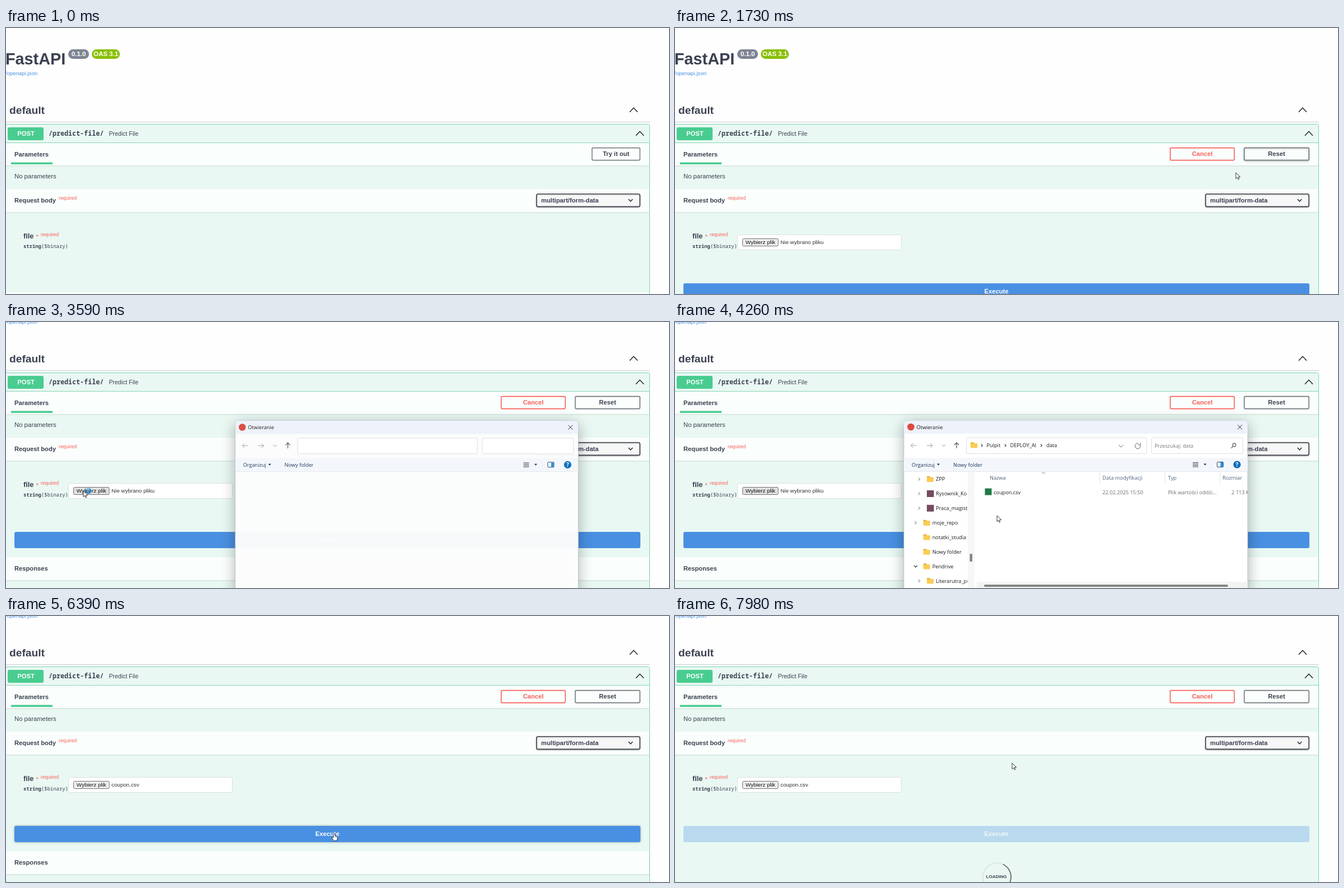
These frames come from a looping animation (1182x474 px, 8 s). An HTML page with a canvas:

```html
<!DOCTYPE html>
<html lang="pl">
<head>
<meta charset="utf-8">
<title>API docs</title>
<style>
  html, body { margin: 0; width: 100%; height: 100%; overflow: hidden; background: #fefefe; }
  canvas { display: block; }
</style>
</head>
<body>
<canvas id="stage" width="1182" height="474"></canvas>
<script>
const ctx = document.getElementById('stage').getContext('2d');
const LOOP = 8000;
const SANS = '"Liberation Sans", Arial, sans-serif';
const MONO = '"Noto Sans Mono", monospace';
const UI = '"Open Sans", sans-serif';
const INK = '#3b4151', RED = '#f9605a', GREEN = '#49cc90', MINT = '#e9f8f3', PALE = '#fafefc';
const BLUE = [73, 144, 226];

// Key moments in ms
const TRY = 1330, PICK = 2990, DIALOG = 3450, LISTED = 3900, CHOSEN = 5460, SEND = 6786;
const PATH = [
  [330, 1021, 436], [990, 1085, 226], [1264, 1085, 226], [1990, 965, 271],
  [2130, 965, 271], [2860, 138, 301], [3860, 138, 301], [4260, 574, 345],
  [4500, 606, 312], [5650, 606, 312], [5660, 606, 314], [5890, 606, 314],
  [6390, 585, 387], [6800, 585, 387], [7520, 601, 262], [8000, 601, 262]
];
const CLICKS = [[1190, 1330], [2860, 2990], [4520, 4585], [4650, 5200], [6720, 6850]];

const ramp = (t, a, b) => Math.min(1, Math.max(0, (t - a) / (b - a)));
const smooth = u => u * u * (3 - 2 * u);
const within = (t, a, b) => t >= a && t < b;
const blend = (a, b, u) => `rgb(${a.map((v, i) => Math.round(v + (b[i] - v) * u))})`;

function text(s, x, y, size, { color = INK, weight = 400, font = SANS, align = 'left' } = {}) {
  ctx.font = `${weight} ${size}px ${font}`;
  ctx.fillStyle = color;
  ctx.textAlign = align;
  ctx.fillText(s, x, y);
}
const bold = (s, x, y, size = 11.2, color = INK, align = 'left') =>
  text(s, x, y, size, { color, weight: 700, align });
const ui = (s, x, y, color = '#1b1b1b') => text(s, x, y, 9.2, { color, font: UI });

function rect(x, y, w, h, color) {
  ctx.fillStyle = color;
  ctx.fillRect(x, y, w, h);
}

function box(x, y, w, h, r, fill, stroke, lw = 1) {
  ctx.beginPath();
  ctx.roundRect(x, y, w, h, r);
  if (fill) { ctx.fillStyle = fill; ctx.fill(); }
  if (stroke) { ctx.strokeStyle = stroke; ctx.lineWidth = lw; ctx.stroke(); }
}

function line(points, color, lw = 1) {
  ctx.beginPath();
  points.forEach(([x, y]) => ctx.lineTo(x, y));
  ctx.strokeStyle = color;
  ctx.lineWidth = lw;
  ctx.stroke();
}

function disc(x, y, r, color) {
  ctx.beginPath();
  ctx.arc(x, y, r, 0, 7);
  ctx.fillStyle = color;
  ctx.fill();
}

function arc(x, y, r, from, to, color, lw) {
  ctx.beginPath();
  ctx.arc(x, y, r, from, to);
  ctx.strokeStyle = color;
  ctx.lineWidth = lw;
  ctx.stroke();
}

function polygon(points, fill, stroke, lw = 0.9) {
  ctx.beginPath();
  points.forEach(([x, y]) => ctx.lineTo(x, y));
  ctx.closePath();
  ctx.fillStyle = fill;
  ctx.fill();
  if (stroke) { ctx.strokeStyle = stroke; ctx.lineWidth = lw; ctx.stroke(); }
}

// dy < 0 points up, dy > 0 points down
const caret = (x, y, dx, dy, color, lw) =>
  line([[x - dx, y - dy], [x, y + dy], [x + dx, y - dy]], color, lw);
const caretRight = (x, y, d, color, lw = 1) =>
  line([[x - d / 2, y - d], [x + d / 2, y], [x - d / 2, y + d]], color, lw);

function withShadow(alpha, blur, dy, draw) {
  ctx.save();
  ctx.shadowColor = `rgba(0,0,0,${alpha})`;
  ctx.shadowBlur = blur;
  ctx.shadowOffsetY = dy;
  draw();
  ctx.restore();
}

function sectionHead(y, h, label) {
  withShadow(0.12, 2, 1, () => rect(-5, y, 1152, h, PALE));
  bold(label, 15, y + h / 2 + 3.8);
}

function button(label, x, w, color, shade = 0) {
  const draw = () => box(x + 0.8, 213.6, w - 1.6, 22, 2, PALE, color, 1.6);
  if (shade > 0) withShadow(0.35 * shade, 4, 1, draw); else draw();
  bold(label, x + w / 2, 228.4, 11.2, color === RED ? RED : INK, 'center');
}

function required(x, y) {
  text('required', x, y, 8.75, { color: RED });
}

function drawHeader() {
  bold('FastAPI', -1, 64.5, 28.8);
  box(111, 38, 37, 17, 8.5, '#7d8492');
  bold('0.1.0', 129.5, 50, 11.5, '#fff', 'center');
  box(153, 38, 50, 17, 8.5, '#89bf04');
  bold('OAS 3.1', 178, 50, 11.5, '#fff', 'center');
  text('/openapi.json', -1, 83.5, 9.6, { color: '#4990e2' });

  bold('default', 6, 153.3, 19.2);
  caret(1119, 146, 7, -3.7, '#222', 1.5);
  rect(0, 167, 1148, 1, '#c9cbd0');
}

function drawFileInput(t) {
  box(111.5, 368.5, 292, 27, 3, '#fff', '#d9dfdd');
  const hot = within(t, 2780, 5660);
  box(120.5, 375.5, 63.5, 13, 2, hot ? '#e1e1e1' : '#efefef', '#6f6f6f');
  text('Wybierz plik', 152.3, 385.4, 9.85, { color: '#111', align: 'center' });
  text(t < CHOSEN ? 'Nie wybrano pliku' : 'coupon.csv', 188, 385.4, 9.75, { color: '#333' });
}

function drawExecute(t) {
  const fade = 1 - 0.7 * smooth(ramp(t, SEND, SEND + 300));
  const base = [233, 248, 243];
  const bar = () => box(15, 455, 1116, 29, 3, blend(base, BLUE, fade));
  if (within(t, 6200, SEND)) withShadow(0.3, 4, 0, bar); else bar();
  bold('Execute', 573, 473.3, 11.2, blend(base, [255, 255, 255], fade), 'center');
}

function drawLoader(t) {
  const x = 574, y = 546, turn = (t - SEND) / 1000 * 2 * Math.PI - Math.PI / 2;
  arc(x, y, 25, 0, 7, 'rgba(85,85,85,.12)', 1.6);
  arc(x, y, 25, turn - Math.PI / 4, turn + Math.PI / 4, 'rgba(0,0,0,.6)', 1.6);
  bold('LOADING', 573, 547.8, 8, INK, 'center');
}

function drawPage(t) {
  const open = t >= TRY, sending = t >= SEND;
  drawHeader();

  box(-5.5, 171.5, 1153, 700, 3, MINT, '#79d3ad', 1);
  rect(0, 204, 1147, 1, '#8ad5b6');
  box(3, 177, 64, 23, 3, GREEN);
  bold('POST', 35.5, 192, 11.2, '#fff', 'center');
  text('/predict-file/', 76, 192, 11.7, { weight: 700, font: MONO });
  text('Predict File', 183.5, 191.7, 10.5);
  caret(1130, 188, 7, -3.7, '#222', 1.5);

  sectionHead(205, 40, 'Parameters');
  rect(9, 239.5, 74, 3.5, GREEN);
  if (open) {
    button('Cancel', 882, 116, RED);
    button('Reset', 1014, 117, '#73767d', 1 - ramp(t, 1600, 1900));
  } else {
    button('Try it out', 1044, 87, '#7f8288');
  }
  text('No parameters', 15, 267.5, 11.3);

  sectionHead(287, 41, 'Request body');
  required(94, 305.7);
  withShadow(0.25, 2, 1, () => box(945.8, 295.8, 184.4, 22.6, 3, '#f7f7f7', '#41444e', 1.6));
  bold('multipart/form-data', 954, 311);
  caret(1113.5, 307, 3.7, 1.9, '#222', 1.5);

  bold('file', 31, 375.3, 12.8);
  text('*', 53.5, 376, 11.5, { color: RED });
  required(62, 370.5);
  text('string', 31, 391.5, 8.9, { weight: 700, font: MONO });
  text('($binary)', 63, 391.5, 8.9, { weight: 500, font: MONO });

  if (open) {
    drawFileInput(t);
    drawExecute(t);
  }
  if (sending) drawLoader(t);
  else sectionHead(open ? 500 : 471, 41, 'Responses');
}

function folder(x, y) {
  box(x - 6, y - 5, 6, 4, 1, '#e0a22c');
  box(x - 6, y - 3.5, 12, 8.5, 1, '#fbcb52');
}

function drawSidebar() {
  const rows = [
    ['ZPP', 1, 'right'], ['Rysownik_Ko', 1, 'right', 1], ['Praca_magist', 1, 'right', 1],
    ['moje_repo', 0, 'right'], ['notatki_studia', 0], ['Nowy folder', 0],
    ['Pendrive', 0, 'down'], ['Literarutra_pr', 1, 'right']
  ];
  ctx.save();
  ctx.beginPath();
  ctx.rect(408, 267, 113.5, 207);
  ctx.clip();
  rows.forEach(([name, deep, arrow, packed], i) => {
    const y = 280 + i * 25.9, dx = deep * 6.3;
    if (arrow === 'right') caretRight(429 + dx, y, 2.6, '#555');
    if (arrow === 'down') caret(429, y, 3, 1.5, '#222', 1.2);
    if (packed) rect(449, y - 6, 12.5, 12, '#754a62');
    else folder(448.7 + dx, y);
    ui(name, 458.7 + dx, y + 3.3);
  });
  ctx.restore();
  rect(522, 267, 12, 207, '#f6f6f6');
  box(525.5, 413, 4.5, 14, 1, '#858585');
}

function drawFiles(t) {
  const head = '#4c607a', dim = '#6d6d6d';
  if (t >= 4430) box(545, 291, 480, 24, 3, t >= 4520 ? '#cce8ff' : '#e5f3ff');
  caret(657, 268.8, 3, -1.4, '#888', 1);
  [['Nazwa', 561], ['Data modyfikacji', 762], ['Typ', 879], ['Rozmiar', 976]]
    .forEach(([s, x]) => ui(s, x, 281, head));
  [757, 873, 971].forEach(x => rect(x, 267, 1, 21, '#e5e5e5'));
  rect(552.5, 296.5, 12, 12, '#1f7a45');
  ui('coupon.csv', 568, 306.6);
  ui('22.02.2025 15:50', 762, 306.6, dim);
  ui('Plik wartości oddzi...', 879, 306.6, dim);
  ui('2 113 KB', 992, 306.6, dim);
  rect(538, 463, 483, 11, '#f3f3f3');
  box(551, 468, 435, 4, 2, '#858585');
}

function drawNavBar(loaded) {
  const soft = '#9a9a9a', dark = '#444';
  const arrowAt = (x, dir, color) => {
    line([[x - 5, 220], [x + 5, 220]], color);
    line([[x + dir, 216], [x + dir * 5, 220], [x + dir, 224]], color);
  };
  arrowAt(425.5, -1, soft);
  arrowAt(454, 1, soft);
  caret(479, 220, 3.3, 1.6, soft, 1);
  line([[502, 225], [502, 215]], dark, 1.1);
  line([[498, 219], [502, 215], [506, 219]], dark, 1.1);
  box(519.5, 206.5, 321, 28, 1, '#fff', '#dedede');
  box(849.5, 206.5, 163, 28, 1, '#fff', '#dedede');
  if (!loaded) return;
  folder(533, 219.5);
  [547, 589, 653].forEach(x => caretRight(x, 220, 2.3, '#333', 1.1));
  ui('Pulpit', 555.5, 223.3);
  ui('DEPLOY_AI', 597.5, 223.3);
  ui('data', 662, 223.3);
  caret(795, 221, 4, 2, '#666', 1);
  arc(825, 221, 4.8, -0.4, 5, '#666', 1);
  line([[829.6, 215.5], [829.6, 219], [826, 219]], '#666');
  ui('Przeszukaj: data', 855, 223.5, '#767676');
  arc(997, 219, 2.9, 0, 7, '#555', 1.1);
  line([[995, 221.3], [991.5, 224.8]], '#555', 1.2);
}

function drawToolBar() {
  rect(408, 242, 613, 24.5, '#f3f7fb');
  rect(408, 266, 613, 1, '#e4e8ee');
  ui('Organizuj', 422, 257.7, '#1c3558');
  ui('Nowy folder', 496, 257.7, '#1c3558');
  [469.5, 945].forEach(x => polygon([[x - 2.7, 252.5], [x + 2.7, 252.5], [x, 255.5]], '#1c3558'));
  for (let i = 0; i < 4; i++) rect(923, 250 + i * 2.5, 10, 1, '#444');
  box(966.5, 249.5, 11, 9, 1, '#fff', '#23405f');
  rect(972.5, 250, 5, 8.5, '#2b8ed8');
  disc(1002, 254, 6.6, '#0a6cbd');
  text('?', 1002, 257.5, 10, { color: '#fff', weight: 700, font: UI, align: 'center' });
}

function drawDialog(t) {
  const shown = smooth(ramp(t, DIALOG, DIALOG + 160)) * (1 - smooth(ramp(t, 4860, 5030)));
  if (!shown) return;
  const loaded = t >= LISTED, zoom = 0.94 + 0.06 * shown;
  ctx.save();
  ctx.globalAlpha = shown;
  ctx.translate(714, 380);
  ctx.scale(zoom, zoom);
  ctx.translate(-714, -380);
  withShadow(0.32, 26, 6, () => box(408, 175.5, 613, 400, 6, '#fff'));
  box(408, 175.5, 613, 400, 6, null, '#b4bbc0', 0.8);
  ctx.beginPath();
  ctx.roundRect(408, 175.5, 613, 400, 6);
  ctx.clip();
  rect(408, 175, 613, 24, '#eef2fa');
  disc(420.5, 187, 6.3, '#dc4a3d');
  ui('Otwieranie', 430.5, 190.6);
  line([[1003, 183.3], [1011, 191.3]], '#222');
  line([[1011, 183.3], [1003, 191.3]], '#222');
  drawNavBar(loaded);
  drawToolBar();
  if (loaded) {
    drawSidebar();
    drawFiles(t);
  }
  ctx.restore();
}

function cursorAt(t) {
  const i = Math.max(1, PATH.findIndex(k => k[0] > t));
  const [t0, x0, y0] = PATH[i - 1], [t1, x1, y1] = PATH[i];
  const u = smooth(ramp(t, t0, t1));
  return [x0 + (x1 - x0) * u, y0 + (y1 - y0) * u];
}

function drawArrow() {
  polygon([[0, 0], [0, 10.6], [2.5, 8.4], [4.1, 12], [5.8, 11.2], [4.2, 7.8], [7.6, 7.5]],
    '#fff', '#222');
}

function drawHand() {
  ctx.beginPath();
  ctx.moveTo(-1.2, 8);
  ctx.lineTo(-1.2, 0.6);
  ctx.quadraticCurveTo(0, -1.4, 1.2, 0.6);
  ctx.lineTo(1.2, 4.5);
  ctx.quadraticCurveTo(5.5, 4.4, 6, 6.5);
  ctx.quadraticCurveTo(6.3, 10, 4.6, 13.5);
  ctx.lineTo(-0.6, 13.5);
  ctx.quadraticCurveTo(-2.4, 10.8, -4.2, 8.2);
  ctx.quadraticCurveTo(-3.6, 5.6, -1.2, 8);
  ctx.fillStyle = '#fff';
  ctx.fill();
  ctx.strokeStyle = '#222';
  ctx.lineWidth = 0.9;
  ctx.stroke();
  line([[2.7, 5], [2.7, 8]], '#444', 0.6);
  line([[4.3, 5.2], [4.3, 8]], '#444', 0.6);
}

function drawCursor(t) {
  if (t < PATH[0][0]) return;
  const [x, y] = cursorAt(t);
  const onReset = t < 1990 && x > 1014 && y < 237;
  const onExecute = within(t, 5890, SEND) && y > 374;
  ctx.save();
  ctx.translate(x, y);
  if (CLICKS.some(([a, b]) => within(t, a, b))) disc(0, 0, 10, 'rgba(245,245,75,.82)');
  if (within(t, PICK, LISTED)) {
    const a = t / 160;
    arc(9, 0, 4, 0, 7, '#1787d6', 2.4);
    arc(9, 0, 4, a, a + 1.6, '#7cc6f5', 2);
  }
  if (onReset || onExecute) drawHand(); else drawArrow();
  ctx.restore();
}

function frame(now) {
  const t = now % LOOP;
  rect(0, 0, 1182, 474, '#fefefe');
  ctx.save();
  ctx.translate(0, -Math.round(81 * smooth(ramp(t, 2150, 2350))));
  drawPage(t);
  ctx.restore();
  drawDialog(t);
  drawCursor(t);
}

const start = performance.now();
function tick() {
  frame(performance.now() - start);
  requestAnimationFrame(tick);
}
tick();
</script>
</body>
</html>
```
